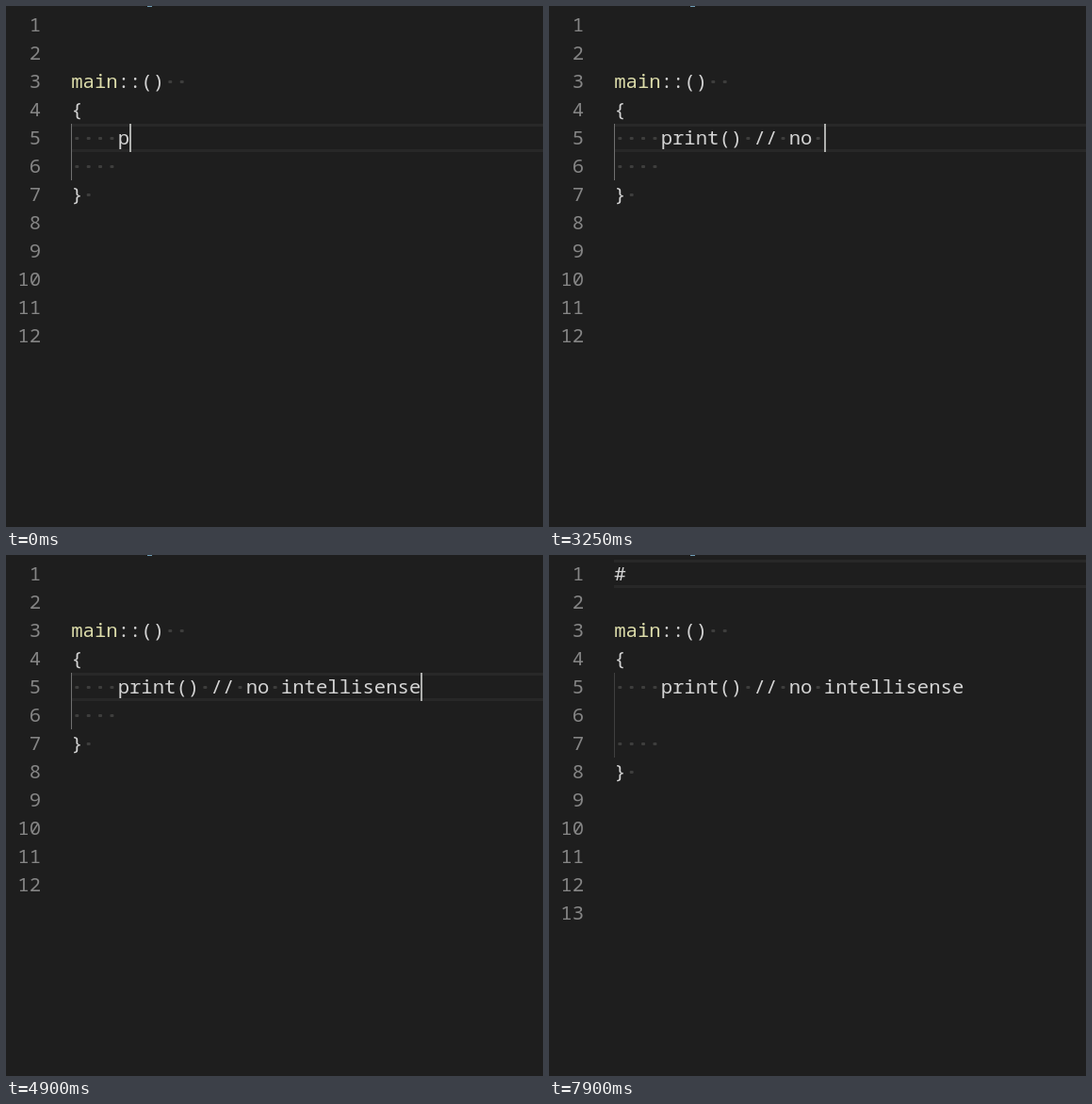
Animation, 570 px wide and 553 px high, one loop 8000 ms. Source, as an HTML page with a canvas:

```html
<!DOCTYPE html>
<html lang="en">
<head>
<meta charset="utf-8">
<title>Code editor</title>
<style>
  html, body { margin: 0; height: 100%; overflow: hidden; background: #1e1e1e; }
  canvas { display: block; }
</style>
</head>
<body>
<canvas id="stage" width="570" height="553"></canvas>
<script>
const LOOP = 8000, BLINK = 320;
const LEFT = 69.15, CELL = 12.37, LINE = 30;
const g = document.getElementById('stage').getContext('2d');

// Keystrokes: [time, key]. '<' deletes, '@' jumps to line 2, '^' goes up.
const keys = [];
function type(from, to, text) {
  const step = text.length > 1 ? (to - from) / (text.length - 1) : 0;
  [...text].forEach((key, i) => keys.push([from + i * step, key]));
}
type(130, 350, 'ri');
type(670, 670, 'n');
type(1020, 1020, 't');
type(1580, 1780, '()');
type(2020, 2260, '??');
type(2350, 2350, '?');
type(2580, 2580, '<');
type(2670, 3250, '<< // no ');
type(3310, 3360, 'it');
type(3580, 4140, '<ntellisen');
type(4210, 4260, 'se');
type(5580, 5580, '\n');
type(6670, 6670, '@');
type(7070, 7070, '^');
type(7150, 7220, '3i');
type(7460, 7580, '<<#');

function editorAt(time) {
  const lines = ['', '', 'main::()  ', '{', '    p', '    ', '} ', '', '', '', '', ''];
  let row = 4, last = 0;
  for (const [at, key] of keys) {
    if (at > time) break;
    last = at;
    if (key === '\n') lines.splice(++row, 0, '    ');
    else if (key === '@') row = 1;
    else if (key === '^') row = 0;
    else {
      lines[row] = key === '<' ? lines[row].slice(0, -1) : lines[row] + key;
      if (row === 0) lines[5] = '';   // auto-indent is trimmed on the next edit
    }
  }
  return { lines, row, caret: Math.floor((time - last) / BLINK) % 2 === 0 };
}

const rowY = row => 5 + row * LINE;
const colX = col => LEFT + col * CELL;

function box(color, x, y, w, h) {
  g.fillStyle = color;
  g.fillRect(x, y, w, h);
}

function dot(x, y) {
  g.fillStyle = '#3e3e3d';
  g.beginPath();
  g.roundRect(x - 2, y + 14, 4, 3, 1);
  g.fill();
}

function drawLine(text, row) {
  const y = rowY(row);
  g.fillStyle = '#858585';
  [...String(row + 1)].reverse().forEach((d, i) => g.fillText(d, 37 - (i + 1) * CELL, y + 22));
  [...text].forEach((c, col) => {
    if (c === ' ') return dot(colX(col + 0.5), y);
    g.fillStyle = row === 2 && col < 4 ? '#dcdcaa' : '#d4d4d4';
    g.fillText(c, colX(col), y + 22);
  });
}

function draw(time) {
  const { lines, row, caret } = editorAt(time);
  const y = rowY(row);
  box('#1e1e1e', 0, 0, 570, 553);
  box('#6f9db5', 150, 0, 5, 1);   // descender of the line scrolled off

  // Current line border and indent guide
  box('#282828', 69, y, 501, 3);
  box('#282828', 69, y + LINE - 3, 501, 3);
  const guideEnd = lines.indexOf('} ');
  box(row >= 4 ? '#707070' : '#404040', 69, rowY(4), 1, (guideEnd - 4) * LINE);

  g.font = '20.6px "Noto Sans Mono", Consolas, monospace';
  lines.forEach(drawLine);
  if (caret) box('#aeafad', Math.round(colX(lines[row].length)), y, 2, LINE);
}

const start = performance.now();
function frame() {
  draw((performance.now() - start) % LOOP);
  requestAnimationFrame(frame);
}
frame();
</script>
</body>
</html>
```
